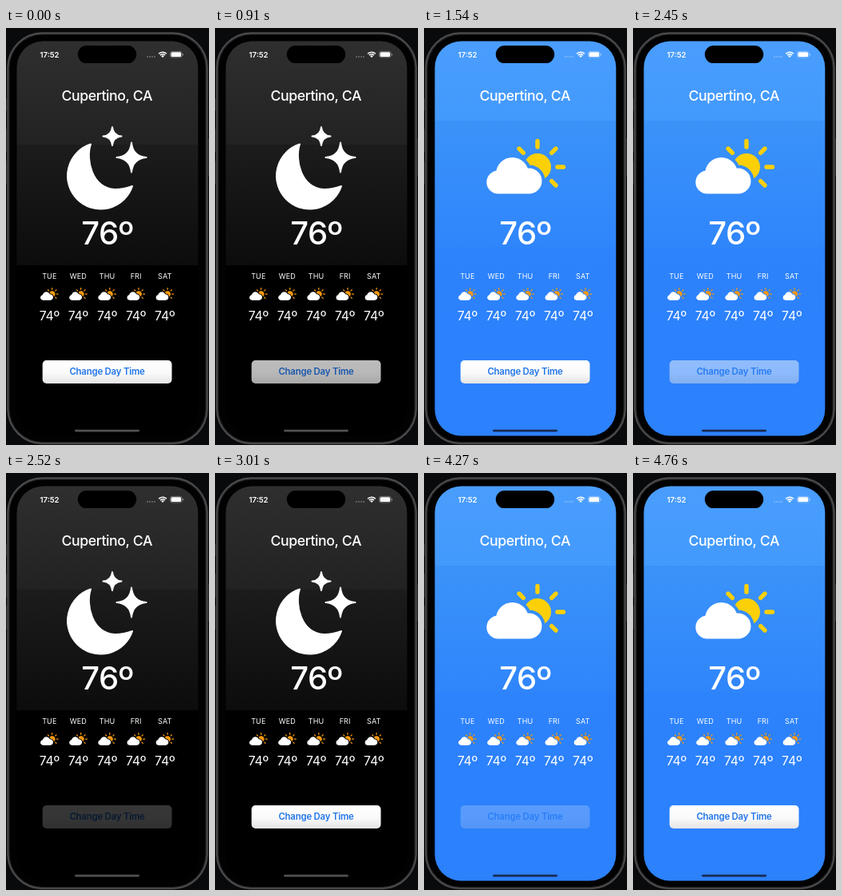
An HTML page with a canvas for the animation above (5320 ms loop, 254 by 522 pixels).

```html
<!DOCTYPE html>
<html lang="en">
<head>
<meta charset="utf-8">
<title>Weather</title>
<style>
  html, body { margin: 0; width: 100%; height: 100%; overflow: hidden; background: #090a0c; }
  canvas { display: block; width: 254px; height: 522px; }
</style>
</head>
<body>
<canvas id="stage"></canvas>
<script>
const W = 254, H = 522, LOOP = 5320, STEP = 70;
const TAPS = [910, 2380, 4130];
const PRESS = 210, RELEASE = 350, SWAP = 140, DIM = 0.21;
const FONT = 'Inter, "Liberation Sans", sans-serif';

const canvas = document.getElementById('stage');
const ctx = canvas.getContext('2d');
const dpr = window.devicePixelRatio || 1;
canvas.width = W * dpr;
canvas.height = H * dpr;

function roundBox(c, x, y, w, h, r) {
  c.beginPath();
  c.roundRect(x, y, w, h, r);
}

function fillBox(c, x, y, w, h, r, fill) {
  c.fillStyle = fill;
  roundBox(c, x, y, w, h, r);
  c.fill();
}

function vertical(c, y0, y1, stops) {
  const g = c.createLinearGradient(0, y0, 0, y1);
  for (const [y, color] of stops) g.addColorStop((y - y0) / (y1 - y0), color);
  return g;
}

function label(c, text, x, y, size, weight, color, spacing = 0) {
  c.font = `${weight} ${size}px ${FONT}`;
  c.letterSpacing = spacing + 'px';
  c.textAlign = 'center';
  c.fillStyle = color;
  c.fillText(text, x, y);
  c.letterSpacing = '0px';
}

// An offscreen layer that can be drawn with its own opacity or scale.
function layer(x, y, w, h, scale, paint) {
  const el = document.createElement('canvas');
  el.width = Math.ceil(w * scale);
  el.height = Math.ceil(h * scale);
  const c = el.getContext('2d');
  c.scale(scale, scale);
  c.translate(-x, -y);
  paint(c);
  return el;
}

const ICON = { x: 77, y: 137, w: 102, h: 72 };

function cloudPath() {
  const p = new Path2D();
  for (const [x, y, r] of [[92.8, 193, 14.5], [110.5, 182.5, 20.5], [131.5, 191.5, 16]]) {
    p.moveTo(x + r, y);
    p.arc(x, y, r, 0, Math.PI * 2);
  }
  p.rect(92.8, 186, 38.7, 21.5);
  return p;
}

function paintCloudSun(c, color) {
  const cx = 142, cy = 174;
  c.fillStyle = c.strokeStyle = color;
  c.beginPath();
  c.arc(cx, cy, 17, 0, Math.PI * 2);
  c.fill();
  c.lineWidth = 5.4;
  c.lineCap = 'round';
  for (let i = -3; i <= 1; i++) {
    const a = i * Math.PI / 4;
    c.beginPath();
    c.moveTo(cx + 25 * Math.cos(a), cy + 25 * Math.sin(a));
    c.lineTo(cx + 32.5 * Math.cos(a), cy + 32.5 * Math.sin(a));
    c.stroke();
  }
  const cloud = cloudPath();
  c.globalCompositeOperation = 'destination-out';
  c.lineWidth = 8;
  c.stroke(cloud);
  c.globalCompositeOperation = 'source-over';
  c.fillStyle = '#fff';
  c.fill(cloud);
}

function cloudSun(color, scale) {
  return layer(ICON.x, ICON.y, ICON.w, ICON.h, scale, c => paintCloudSun(c, color));
}

function star(c, x, y, r) {
  const k = r * 0.08, q = r - 1;
  c.beginPath();
  c.moveTo(x, y - q);
  c.quadraticCurveTo(x + k, y - k, x + q, y);
  c.quadraticCurveTo(x + k, y + k, x, y + q);
  c.quadraticCurveTo(x - k, y + k, x - q, y);
  c.quadraticCurveTo(x - k, y - k, x, y - q);
  c.closePath();
  c.fill();
  c.stroke();
}

const crescent = new Path2D(
  'M106 145.5 C99.5 165 107.5 200 136 202 C145 202.3 151 200.5 158 198 A41.5 41.5 0 1 1 106 145.5 Z');

function paintMoon(c) {
  c.fillStyle = c.strokeStyle = '#fff';
  c.lineJoin = 'round';
  c.lineWidth = 2;
  c.fill(crescent);
  c.stroke(crescent);
  star(c, 133, 135.5, 12.5);
  star(c, 157, 162, 19.5);
}

function paintPhone(c) {
  c.fillStyle = '#090a0c';
  c.fillRect(0, 0, W, H);
  for (const [x, y, h] of [[0, 88, 16], [0, 126, 30], [0, 166, 30], [252, 138, 48]])
    fillBox(c, x, y, 2, h, 1, '#29292b');
  fillBox(c, 1, 5, 252, 516.5, 45, '#232325');
  c.lineWidth = 1.8;
  c.strokeStyle = '#4c4c4e';
  roundBox(c, 2.4, 6.5, 249.2, 513.6, 43);
  c.stroke();
  fillBox(c, 4.6, 8.6, 244.8, 509.4, 41, '#020202');
}

function paintStatus(c) {
  label(c, '17:52', 54.5, 36.6, 9.6, 600, '#fff');
  fillBox(c, 89.8, 22.1, 73.4, 22, 11, '#000');

  c.fillStyle = 'rgba(255,255,255,.35)';
  for (let i = 0; i < 4; i++) {
    c.beginPath();
    c.arc(177 + 3 * i, 36, 0.9, 0, Math.PI * 2);
    c.fill();
  }

  c.strokeStyle = c.fillStyle = '#fff';
  c.lineWidth = 1.5;
  c.lineCap = 'butt';
  for (const r of [4.2, 6.8]) {
    c.beginPath();
    c.arc(196, 37, r, -Math.PI * 0.76, -Math.PI * 0.24);
    c.stroke();
  }
  c.beginPath();
  c.moveTo(196, 37);
  c.arc(196, 37, 2.6, -Math.PI * 0.76, -Math.PI * 0.24);
  c.fill();

  c.strokeStyle = 'rgba(255,255,255,.45)';
  c.lineWidth = 0.7;
  roundBox(c, 205.5, 29.3, 14.6, 7.6, 2.4);
  c.stroke();
  fillBox(c, 206.5, 30.3, 12.6, 5.6, 1.5, '#fff');
  fillBox(c, 220.9, 31.9, 1, 2.5, 0.5, 'rgba(255,255,255,.5)');
}

function paintScene(c, night) {
  paintPhone(c);
  const sky = night
    ? [[16, '#2f2f2f'], [146, '#222222'], [146, '#1c1c1c'], [297, '#0c0c0c'], [297, '#000'], [511, '#000']]
    : [[16, '#4a9dfd'], [116, '#429afc'], [116, '#3b93f9'], [275, '#2f85fb'], [275, '#2d83fc'],
       [360, '#2c81fc'], [511, '#2c81fc']];
  fillBox(c, 13.5, 16.4, 226.8, 494.2, 33, vertical(c, 16, 511, sky));
  paintStatus(c);

  label(c, 'Cupertino, CA', 126.3, 91.2, 17.7, 500, '#fff', -0.42);
  if (night) paintMoon(c);
  else c.drawImage(bigSun, ICON.x, ICON.y, ICON.w, ICON.h);
  label(c, '76º', 126.8, 271, 40, 500, '#fff', -0.6);

  ['TUE', 'WED', 'THU', 'FRI', 'SAT'].forEach((day, i) => {
    const x = 54.3 + 36.1 * i, k = 0.232;
    label(c, day, x, 313.6, 9, 400, '#fff', 0.1);
    c.drawImage(smallSun, x - 11.5, 324.6, ICON.w * k, ICON.h * k);
    label(c, '74º', x, 365.7, 15.8, 400, '#fff', -0.2);
  });

  fillBox(c, 86, 502.7, 81, 2.7, 1.35, night ? '#505050' : '#182a52');
}

function paintButton(c) {
  const face = vertical(c, 416, 445, [[416, '#fff'], [432, '#fafafa'], [445, '#e4e4e4']]);
  fillBox(c, 45.7, 416, 161.8, 29, 5, face);
  label(c, 'Change Day Time', 126.5, 434.4, 11.4, 600, '#2275e8', -0.2);
}

const bigSun = cloudSun('#fbd008', dpr);
const smallSun = cloudSun('#f5980f', 0.464 * dpr);
const full = paint => layer(0, 0, W, H, dpr, paint);
const day = full(c => paintScene(c, false));
const dark = full(c => paintScene(c, true));
const button = full(paintButton);

const ease = u => u * u * (3 - 2 * u);

function buttonAlpha(t) {
  for (const tap of TAPS) {
    const p = t - tap + STEP;
    if (p <= 0 || p >= PRESS + RELEASE) continue;
    if (p < PRESS) return 1 - (1 - DIM) * p / PRESS;
    return DIM + (1 - DIM) * ease((p - PRESS) / RELEASE);
  }
  return 1;
}

function draw(now) {
  const t = Math.floor((now % LOOP) / STEP) * STEP;
  const toggles = TAPS.filter(tap => t >= tap + SWAP).length;
  ctx.globalAlpha = 1;
  ctx.drawImage(toggles % 2 ? day : dark, 0, 0);
  ctx.globalAlpha = buttonAlpha(t);
  ctx.drawImage(button, 0, 0);
}

const start = performance.now();
function tick() {
  draw(performance.now() - start);
  requestAnimationFrame(tick);
}
tick();
</script>
</body>
</html>
```
